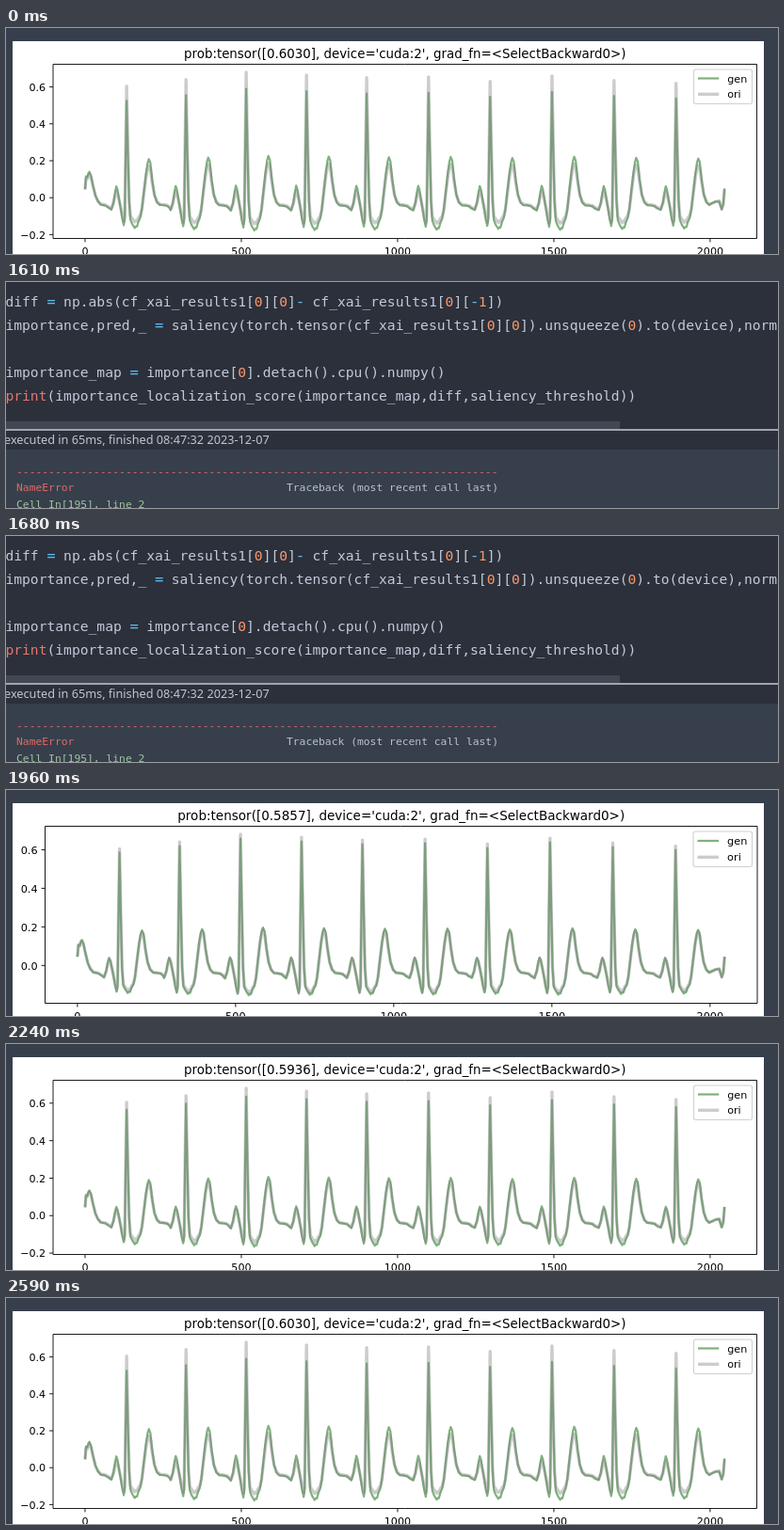
These frames come from a looping animation (820x240 px, 3920 ms). An HTML page with a canvas:

```html
<!DOCTYPE html>
<html lang="en">
<head>
<meta charset="utf-8">
<title>Signal notebook</title>
<style>
html, body { margin: 0; width: 100%; height: 100%; overflow: hidden; background: #373f4c; }
canvas { display: block; }
</style>
</head>
<body>
<canvas id="stage" width="820" height="240"></canvas>
<script>
const ctx = document.getElementById('stage').getContext('2d');
const SANS = '"DejaVu Sans", sans-serif';
const MONO = '"DejaVu Sans Mono", monospace';
const LOOP = 3920;
const SAMPLES = 2047;
const TOP_VALUE = 0.68;

// Start time and scene: 'code', or the optimisation step being plotted.
const timeline = [[0, 4], [1540, 'code'], [1890, 0], [1960, 1], [2240, 2], [2380, 3], [2590, 4]];
const probs = ['0.5757', '0.5857', '0.5936', '0.5994', '0.6030'];

// Each point: sample, grey curve value, offset of the green curve at the last step.
const lead = [[0, .045, 0], [3, .105, .01], [7, .1, .01], [11, .122, .012], [14, .128, .012],
  [19, .11, .01], [25, .065, .004], [33, .012, 0], [41, -.018, 0], [50, -.034, -.004],
  [65, -.039, -.004], [76, -.05, -.005]];
const beat = [[-49, -.06, -.005], [-42, -.03, .005], [-37, .01, .02], [-33, .032, .029],
  [-29, .02, .022], [-24, -.015, .005], [-18, -.06, -.01], [-14, -.095, -.018], [-9, -.129, -.02],
  [-6, -.1, -.015], [-3, .28, -.04], [0, .605, -.08], [4, .27, -.035], [8, -.01, -.01],
  [12, -.098, -.02], [18, -.113, -.03], [26, -.131, -.033], [29, -.124, -.032], [33, -.127, -.03],
  [38, -.107, -.022], [44, -.094, -.012], [49, -.06, 0], [55, .02, .01], [62, .11, .022],
  [67, .155, .032], [71, .172, .037], [76, .155, .034], [82, .08, .015], [89, .015, 0],
  [97, -.02, -.005], [106, -.035, -.004], [120, -.038, -.003], [130, -.041, -.004], [137, -.05, -.005]];
const tail = [[2005, -.031, 0], [2018, -.021, 0], [2029, -.017, -.004], [2037, -.06, -.004],
  [2042, -.035, 0], [2046, .045, .005]];
const peaks = [[133, .605], [323, .64], [515.5, .68], [708.5, .665], [901, .65],
  [1099, .655], [1296, .63], [1494, .66], [1692.5, .635], [1891, .62]];

const signal = [
  ...lead,
  ...peaks.flatMap(([at, height], i) => beat
    .filter(([offset]) => i < peaks.length - 1 || offset < 110)
    .map(([offset, value, change]) => {
      const gain = Math.abs(offset) < 5 ? height / .605 : 1 + (height - .605) * 1.1;
      return [at + offset, value * gain, change * gain];
    })),
  ...tail
];

function text(string, x, y, size, family, color, align = 'left') {
  ctx.font = `${size}px ${family}`;
  ctx.fillStyle = color;
  ctx.textAlign = align;
  ctx.fillText(string, x, y);
}

function rect(x, y, w, h, color) {
  ctx.fillStyle = color;
  ctx.fillRect(x, y, w, h);
}

function line(points, width, color) {
  ctx.beginPath();
  points.forEach(([x, y]) => ctx.lineTo(x, y));
  ctx.lineWidth = width;
  ctx.strokeStyle = color;
  ctx.stroke();
}

function drawPlot(step) {
  const d = step / 4;
  const wide = step < 2;
  const left = wide ? 41.5 : 50, right = wide ? 798 : 797.5;
  const top = 38.5, bottom = wide ? 226.5 : 223.5;
  const pt = wide ? 1.129 : 1.115;
  const width = right - left, height = bottom - top;
  const low = -.1415 - .0575 * d + .021 * d * d;
  const scale = height / 1.1 / (TOP_VALUE - low);
  const px = x => left + width * (.05 + x / SAMPLES) / 1.1;
  const py = v => top + height * .05 / 1.1 + (TOP_VALUE - v) * scale;
  const troughs = 1.575 * d - .575 * d * d;
  const green = 'rgba(0,100,0,.5)', grey = 'rgba(128,128,128,.4)';

  rect(0, 0, 820, 240, '#373f4c');
  rect(7, 14, 798, 226, '#fff');
  text(`prob:tensor([${probs[step]}], device='cuda:2', grad_fn=<SelectBackward0>)`,
    (left + right) / 2, 31.8, 12 * pt, SANS, '#000', 'center');

  ctx.lineJoin = 'round';
  line(signal.map(([x, v, change]) => [px(x), py(v + change * (v < 0 ? troughs : d))]), 2 * pt, green);
  line(signal.map(([x, v]) => [px(x), py(v)]), 3 * pt, grey);

  ctx.lineWidth = .8 * pt;
  ctx.strokeStyle = '#000';
  ctx.strokeRect(left, top, width, height);
  for (const v of wide ? [0, .2, .4, .6] : [-.2, 0, .2, .4, .6]) {
    line([[left - 3.5 * pt, py(v)], [left, py(v)]], .8 * pt, '#000');
    text(v.toFixed(1).replace('-', '\u2212'), left - 7 * pt, py(v) + 4.2, 10 * pt, SANS, '#000', 'right');
  }
  for (let x = 0; x <= 2000; x += 500) {
    line([[px(x), bottom], [px(x), bottom + 3.5 * pt]], .8 * pt, '#000');
    text(x, px(x), bottom + 17, 10 * pt, SANS, '#000', 'center');
  }

  const legendLeft = wide ? 730 : 730.5, legendHeight = wide ? 37.5 : 36.5;
  ctx.beginPath();
  ctx.roundRect(legendLeft, 44, 792.5 - legendLeft, legendHeight, 2.2);
  ctx.fillStyle = 'rgba(255,255,255,.8)';
  ctx.fill();
  ctx.lineWidth = pt;
  ctx.strokeStyle = '#d0d0d0';
  ctx.stroke();
  [['gen', 2, green], ['ori', 3, grey]].forEach(([name, weight, color], i) => {
    const y = (wide ? 54 : 53.5) + i * (wide ? 17.3 : 16.8);
    const x = legendLeft + 4.5;
    line([[x, y], [x + 20 * pt, y]], weight * pt, color);
    text(name, x + 28 * pt, y + 4, 10 * pt, SANS, '#000');
  });
}

const codeLines = [
  [26, 'diff = np.abs(cf_xai_results1[0][0]- cf_xai_results1[0][-1])'],
  [51, 'importance,pred,_ = saliency(torch.tensor(cf_xai_results1[0][0]).unsqueeze(0).to(device),norm'],
  [101, 'importance_map = importance[0].detach().cpu().numpy()'],
  [126, 'print(importance_localization_score(importance_map,diff,saliency_threshold))']
];

function drawCodeLine(y, code) {
  let x = -.6;
  for (const token of code.match(/\bprint\b|[a-z_]\w*|\d+|[=-]|[^\w=-]+/g)) {
    const operator = /^[=-]$/.test(token);
    const color = token === 'print' ? '#e8776f'
      : /^\d/.test(token) ? '#f9976a'
      : operator ? '#5cb8ee' : '#c2c9d8';
    text(token, x, y, 14.65, MONO, color);
    if (operator) text(token, x + .4, y, 14.65, MONO, color);
    x += ctx.measureText(token).width;
  }
}

function drawCode() {
  rect(0, 0, 820, 240, '#2b303b');
  codeLines.forEach(([y, code]) => drawCodeLine(y, code));
  rect(0, 148, 652, 8, '#424753');
  rect(0, 156.3, 820, 1.4, '#d3d7dc');
  text('executed in 65ms, finished 08:47:32 2023-12-07', -2, 171.5, 12.7, '"Noto Sans", sans-serif', '#c0c6d1');
  rect(0, 178, 820, 62, '#373f4c');
  text('-'.repeat(75), 11, 205, 11.34, MONO, '#de6a66');
  text('NameError', 11, 222, 11.34, MONO, '#de6a66');
  text('Traceback (most recent call last)', 523, 222, 11.34, MONO, '#bac1ce', 'right');
  text('Cell In[195], line 2', 11, 240, 11.34, MONO, '#9cc79c');
}

function render() {
  const time = performance.now() % LOOP;
  const scene = timeline.findLast(([start]) => time >= start)[1];
  if (scene === 'code') drawCode();
  else drawPlot(scene);
  requestAnimationFrame(render);
}
render();
</script>
</body>
</html>
```
